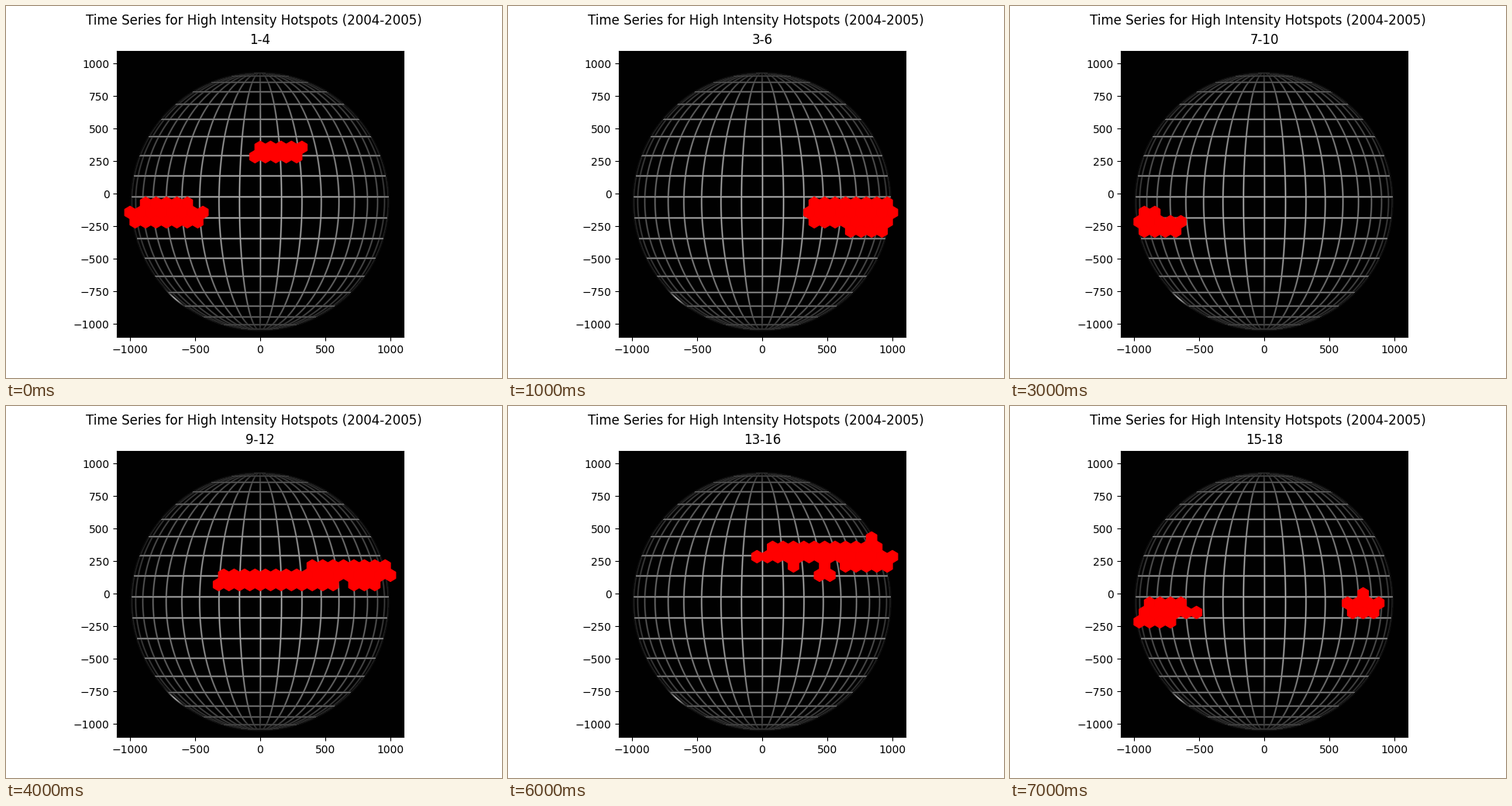
A matplotlib script that plays this animation: 640 px wide and 480 px high, repeating every 8 s.

```python
import numpy as np
import matplotlib.pyplot as plt
from matplotlib.animation import FuncAnimation
from matplotlib.collections import PolyCollection

LIMIT = 1100     # half width of the plotted area
SPAN = 369.6     # its width on screen
STEP = 80        # hexagon width
ROW = 1000 / 14  # distance between hexagon rows

HEXAGON = np.array([(.5, -.5), (.5, .5), (0, 1),
                    (-.5, .5), (-.5, -.5), (0, -1)]) * (STEP, 2 * ROW / 3)

# Active regions as ellipses: centre x, centre y, half width, half height.
SOUTH_EAST = (800, -286, 140, 60)
REGIONS = [
    [(140, 321, 220, 80), (-720, -165, 315, 110)],
    [(680, -143, 360, 120), SOUTH_EAST],
    [(800, -143, 220, 120), SOUTH_EAST, (-760, -214, 220, 80)],
    [(-800, -240, 200, 80), (-880, -143, 60, 50)],
    [(120, 107, 580, 60), (700, 179, 400, 60), (800, 71, 100, 50)],
    [(480, 321, 440, 80), (700, 179, 340, 60)],
    [(480, 300, 560, 85), (800, 214, 180, 50), (480, 165, 60, 80),
     (240, 214, 30, 30), (840, 429, 30, 30)],
    [(-740, -125, 235, 80), (-840, -214, 140, 50), (760, -80, 150, 85)],
]

# Centres of the whole honeycomb; odd rows shift half a cell.
rows, cols = np.mgrid[-14:15, 0:26]
CELLS = np.stack([-1000 + STEP * (cols + rows % 2 / 2), ROW * rows],
                 axis=-1).reshape(-1, 2)


def hexagons(regions):
    """Outlines of the cells whose centre lies in one of the regions."""
    x, y = CELLS.T
    hit = np.zeros(len(CELLS), bool)
    for cx, cy, rx, ry in regions:
        hit |= ((x - cx) / rx) ** 2 + ((y - cy) / ry) ** 2 <= 1
    return CELLS[hit][:, None] + HEXAGON


def line_offset(angle, start, step):
    """Signed angle to the nearest grid line, in radians."""
    turn = (angle - start) / step
    return (turn - np.round(turn)) * step


def stroke(distance, width=1.0):
    return np.exp(-(distance / width) ** 2)


def globe(size=370, radius=165.8):
    """Grey image of a sphere with parallels and meridians."""
    axis = ((np.arange(size) + .5) / size - .5) * SPAN
    x, y = np.meshgrid(axis + .3, 10.3 - axis)
    r = np.hypot(x, y)
    depth = np.sqrt(np.clip(1 - (r / radius) ** 2, 0, 1))
    step = np.radians(9.41)

    lat = np.arcsin(np.clip(y / radius, -1, 1))
    ring = np.maximum(radius * np.cos(lat), 1e-6)
    lon = np.arcsin(np.clip(x / ring, -1, 1))

    slope = np.tan(lat) * np.sin(lon)
    d_lat = line_offset(lat, np.radians(2.08), step) * ring
    d_lon = (line_offset(lon, np.radians(.25), step) * ring * np.cos(lon)
             / np.hypot(1, slope))

    parallels = (.15 + .42 * np.cos(lat) + .18 * depth) * stroke(d_lat)
    meridians = (.08 + .64 * depth) * stroke(d_lon)
    grid = np.where(r < radius, np.maximum(parallels, meridians), 0)

    glint = stroke(np.arctan2(y, x) + 2.29, .07)
    limb = (.05 + .65 * glint) * stroke(r - radius - .5)
    return np.maximum(np.maximum(grid, limb), .006)


fig, ax = plt.subplots(figsize=(6.4, 4.8), dpi=100)
fig.suptitle("Time Series for High Intensity Hotspots (2004-2005)")
ax.imshow(globe(), cmap="gray", vmin=0, vmax=1, interpolation="nearest",
          extent=(-LIMIT, LIMIT, -LIMIT, LIMIT))
ax.set_xticks(range(-1000, 1001, 500))
ax.set_yticks(range(-1000, 1001, 250))
title = ax.set_title("")
spots = PolyCollection([], facecolors="red", edgecolors="red", linewidths=1)
ax.add_collection(spots, autolim=False)


def update(i):
    title.set_text(f"{2 * i + 1}-{2 * i + 4}")
    spots.set_verts(hexagons(REGIONS[i]))
    return title, spots


anim = FuncAnimation(fig, update, frames=len(REGIONS), interval=1000,
                     init_func=lambda: update(0), repeat=True, repeat_delay=0)
plt.show()
```
